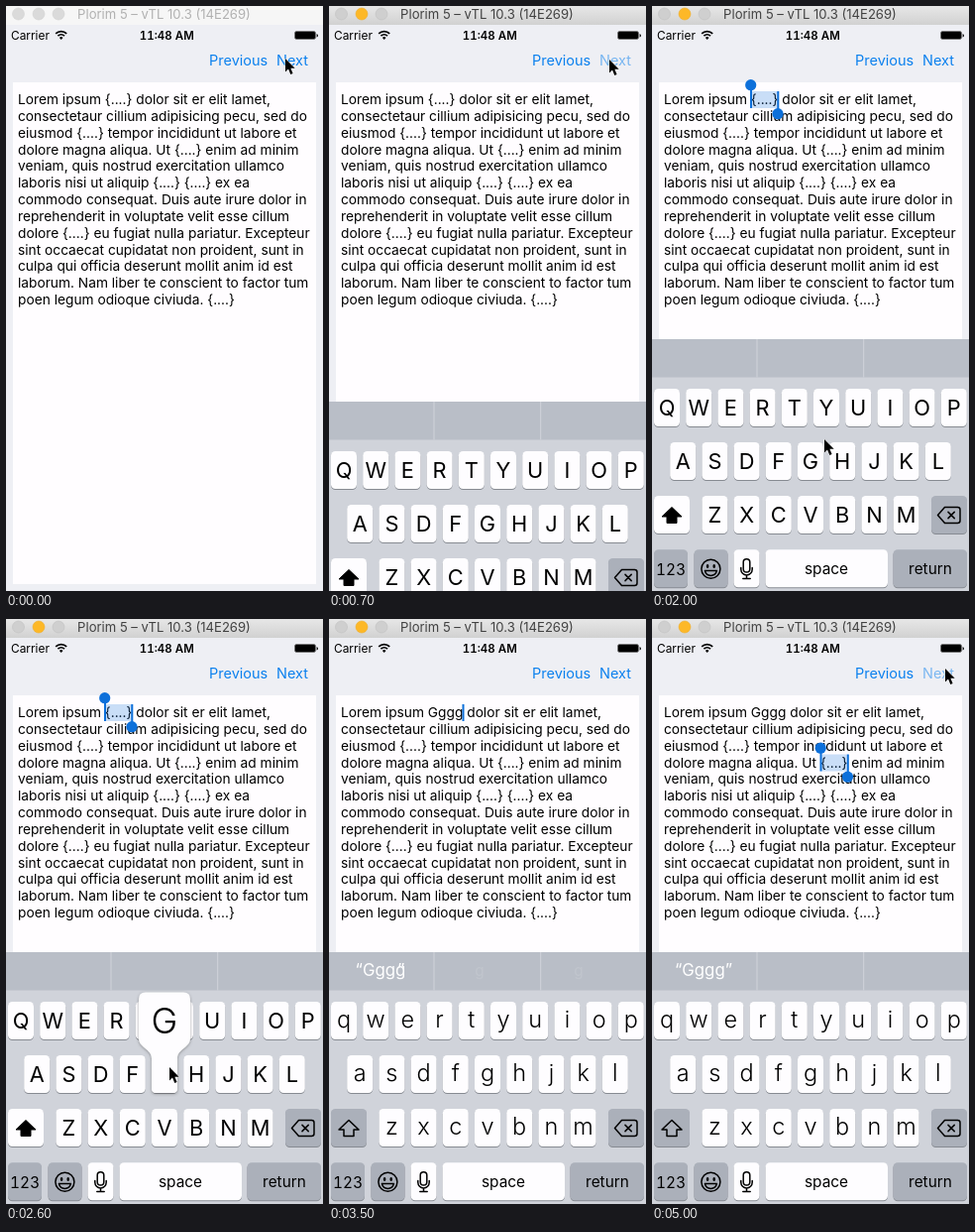
An HTML page for the animation above (5.1 s loop, 320 px wide and 590 px high).

```html
<!DOCTYPE html>
<html lang="en">
<head>
<meta charset="utf-8">
<title>Placeholder navigation</title>
<style>
  html, body { margin: 0; width: 100%; height: 100%; overflow: hidden; background: #eeeff4; }
  svg { display: block; font-family: Inter, Roboto, sans-serif; user-select: none; }
  .mid { text-anchor: middle; }
  .line { fill: none; stroke: #000; stroke-width: 1.5; stroke-linejoin: round; stroke-linecap: round; }
  .blue { fill: #0d70da; }
  .num { font-variant-numeric: tabular-nums; }
</style>
</head>
<body>
<svg width="320" height="590" viewBox="0 0 320 590">
  <defs>
    <linearGradient id="bar" x2="0" y2="1"><stop stop-color="#e7e7e7"/><stop offset="1" stop-color="#d1d1d1"/></linearGradient>
    <filter id="soft" x="-20%" y="-20%" width="140%" height="140%">
      <feDropShadow dx="0" dy="1" stdDeviation="1.5" flood-color="#555" flood-opacity=".55"/>
    </filter>
  </defs>
  <rect width="320" height="590" fill="#eeeff4"/>

  <rect id="titleBar" width="320" height="19"/>
  <g id="lights" stroke-width=".6">
    <circle cx="12.5" cy="8" r="6"/><circle id="amber" cx="33" cy="8" r="6"/><circle cx="53" cy="8" r="6"/>
  </g>
  <text id="title" class="mid" x="159.5" y="13" font-size="13.1">Plorim 5 – vTL 10.3 (14E269)</text>

  <text x="5" y="34" font-size="11.9">Carrier</text>
  <g fill="none" stroke="#000" stroke-width="1.7">
    <path d="M50.2 27.9a7.6 7.6 0 0 1 11 0M52.4 30.2a4.7 4.7 0 0 1 6.6 0"/>
    <path d="M55.7 34l-1.8-2.1a2.6 2.6 0 0 1 3.6 0z" fill="#000" stroke="none"/>
  </g>
  <text class="mid num" x="162.3" y="34" font-size="11.5" font-weight="600">11:48 AM</text>
  <rect x="291.5" y="25.5" width="21" height="8" rx="1.8" stroke="#777" stroke-width=".8"/>
  <path d="M313.6 28v3.6q1.4-.4 1.4-1.8t-1.4-1.8z"/>

  <g font-size="14.5" fill="#0b80ee">
    <text x="205" y="60">Previous</text>
    <text id="next" x="273" y="60">Next</text>
  </g>

  <rect x="7" y="77" width="306" height="506" fill="#fffdff"/>
  <g id="copy" font-size="13.74"></g>
  <rect id="caret" class="blue" y="86" width="2" height="17"/>
  <g id="selection" class="blue">
    <rect x="100" y="86" width="27" height="17" opacity=".22"/>
    <rect x="99" y="82" width="2" height="21"/><circle cx="99.7" cy="79.7" r="5.6"/>
    <rect x="126.3" y="86" width="2" height="21"/><circle cx="127" cy="108.7" r="5.6"/>
  </g>

  <g id="keyboard"></g>
  <path id="cursor" d="M0 0V13.4L3 10.600 5.300 15.900 7.600 14.900 5.400 9.700H9.700Z" stroke="#fff" stroke-width="1" stroke-linejoin="round" paint-order="stroke"/>
</svg>
<script>
const LOOP = 5100, STEP = 100, LINE = 16.84;
const $ = id => document.getElementById(id);
const show = (id, on) => $(id).setAttribute('visibility', on ? 'visible' : 'hidden');
const set = (id, attrs) => { for (const k in attrs) $(id).setAttribute(k, attrs[k]); };

const copy = [
  'Lorem ipsum {....} dolor sit er elit lamet,',
  'consectetaur cillium adipisicing pecu, sed do',
  'eiusmod {....} tempor incididunt ut labore et',
  'dolore magna aliqua. Ut {....} enim ad minim',
  'veniam, quis nostrud exercitation ullamco',
  'laboris nisi ut aliquip {....} {....} ex ea',
  'commodo consequat. Duis aute irure dolor in',
  'reprehenderit in voluptate velit esse cillum',
  'dolore {....} eu fugiat nulla pariatur. Excepteur',
  'sint occaecat cupidatat non proident, sunt in',
  'culpa qui officia deserunt mollit anim id est',
  'laborum. Nam liber te conscient to factor tum',
  'poen legum odioque civiuda. {....}'
];
$('copy').innerHTML = copy.map((s, i) => `<text x="12" y="${99 + i * LINE}">${s}</text>`).join('');
const firstLine = $('copy').firstChild;

// Keyboard, drawn in its raised position
const GRAY = '#abb0ba';
const key = (x, y, w, fill = '#fefdff') =>
  `<rect x="${x}" y="${y + 1}" width="${w}" height="38" rx="4.5" fill="#878b92"/>` +
  `<rect x="${x}" y="${y}" width="${w}" height="38" rx="4.5" fill="${fill}"/>`;
const label = (x, y, s, size = 15.4) => `<text class="mid num" x="${x}" y="${y}" font-size="${size}">${s}</text>`;

let caps = '', upper = '', lower = '';
[['QWERTYUIOP', 15, 386], ['ASDFGHJKL', 31.2, 440], ['ZXCVBNM', 63.4, 494]].forEach(([row, x0, y]) => {
  [...row].forEach((c, i) => {
    const x = x0 + i * 32.2;
    caps += key(x - 13, y, 26);
    upper += label(x, y + 26.7, c, 21.8);
    lower += label(x, y + 25.5, c.toLowerCase(), 23.5);
  });
});
const arrow = 'M20 505.5L30 515H25V521.5H15V515H10Z';

$('keyboard').innerHTML = `
  <rect y="336" width="320" height="260" fill="#d0d3da"/>
  <rect y="336" width="320" height="38.5" fill="#b9bec7"/>
  <path d="M106 336v38.5M213.7 336v38.5" stroke="#d0d3da"/>
  <g fill="#fff">
    <text id="guess" class="mid" x="52" y="360" font-size="16.8"></text>
    <g id="ghost"><text x="69" y="360" font-size="16.8">”</text>
      <g opacity=".1">${label(152, 360, 'g') + label(252, 360, 'g')}</g></g>
  </g>
  ${caps}
  <g id="upper">${upper}${key(2, 494, 36)}<path d="${arrow}" stroke="#000" stroke-linejoin="round"/></g>
  <g id="lower"><g font-weight="350">${lower}</g>${key(2, 494, 36, GRAY)}<path class="line" d="${arrow}"/></g>
  ${key(282, 494, 36, GRAY)}
  <path class="line" d="M288.500 513.500L295.500 505.500H308.500q2.500 0 2.500 2.500V519q0 2.500-2.500 2.500H295.500ZM299 510.400l6.200 6.200m0-6.200l-6.200 6.200"/>
  ${key(2, 548.3, 34, GRAY)}${label(19, 574, '123')}
  ${key(42.5, 548.3, 34, GRAY)}
  <circle class="line" cx="59.4" cy="567.8" r="9.5"/>
  <ellipse cx="56.1" cy="565" rx="1.3" ry="1.9"/><ellipse cx="62.7" cy="565" rx="1.3" ry="1.9"/>
  <path class="line" d="M53.4 569.4h12q-1 5-6 5t-6-5z"/>
  <g id="wide">${key(82.5, 548.3, 155.5)}${label(160, 573.3, 'space')}</g>
  <g id="withMic">${key(82.5, 548.3, 26)}${key(114.5, 548.3, 123.5)}${label(176, 573.3, 'space')}
    <rect class="line" x="92.2" y="557.7" width="6.6" height="13.4" rx="3.3"/>
    <path class="line" d="M89.8 566.5v1.8a5.7 5.7 0 0 0 11.4 0v-1.8M95.5 574v3.6M91.8 577.6h7.4"/></g>
  ${key(243.5, 548.3, 74.5, GRAY)}${label(281, 573.3, 'return')}
  <g id="popup"><path filter="url(#soft)" fill="#fefdff" d="M141 376.5h38q7 0 7 7V423c0 9-13 11-13 20V474q0 4-4 4H151q-4 0-4-4V443c0-9-13-11-13-20V383.5q0-7 7-7z"/>
    <text id="popupLetter" class="mid" x="160" y="418" font-size="36" font-weight="300"></text></g>`;

// Eased interpolation through [time, ...values] stops
function track(t, stops) {
  const i = stops.findIndex(s => s[0] > t);
  if (i < 0) return stops.at(-1).slice(1);
  if (!i) return stops[0].slice(1);
  const a = stops[i - 1], b = stops[i], u = (t - a[0]) / (b[0] - a[0]), e = u * u * (3 - 2 * u);
  return a.slice(1).map((v, k) => v + (b[k + 1] - v) * e);
}

const pointer = [[0, 282, 53], [100, 283, 54], [1300, 283, 54], [1700, 182, 502], [1800, 180, 500],
  [2000, 174, 437], [2400, 165, 452], [3400, 165, 452], [3600, 320, 340], [3800, 312, 230], [4200, 296, 50]];
const nextAlpha = [[300, 1], [400, .25], [600, .25], [700, .52], [900, 1], [4300, 1], [4400, .25],
  [4500, .5], [4700, 1], [4900, 1], [5000, .5]];
const typedAt = [2700, 3000, 3200, 3400];

function draw(t) {
  const active = t >= 200;
  set('titleBar', { fill: active ? 'url(#bar)' : '#f6f6f6' });
  set('title', { fill: active ? '#424242' : '#b1b1b1' });
  set('lights', { fill: active ? '#cfcfcf' : '#dadada', stroke: active ? '#c2c2c2' : '#d2d2d2' });
  set('amber', active ? { fill: '#fdb827', stroke: '#eeae2c' } : { fill: '#dadada', stroke: '#d2d2d2' });
  set('next', { opacity: track(t, nextAlpha)[0] });

  // Critically damped spring raises the keyboard
  const w = 18.26 * Math.max(0, t - 552) / 1000;
  set('keyboard', { transform: `translate(0 ${Math.round(254 * (1 + w) * Math.exp(-w))})` });
  show('wide', t < 1100);
  show('withMic', t >= 1100);

  const count = typedAt.filter(k => t >= k).length, word = 'Gggg'.slice(0, count);
  firstLine.textContent = count ? copy[0].replace('{....}', word) : copy[0];
  show('upper', !count);
  show('lower', count);

  const swapping = t >= 3400 && t < 3600;
  $('guess').textContent = count ? '“' + word + (swapping ? '' : '”') : '';
  show('ghost', swapping);

  show('popup', t >= 2500 && t < 2700 || typedAt.slice(1).some(k => t >= k - STEP && t < k));
  $('popupLetter').textContent = count ? 'g' : 'G';

  const second = t >= 4500;
  show('selection', t >= 1100 && !count || second);
  set('selection', { transform: second ? `translate(70.5 ${3 * LINE})` : '' });
  set('caret', { x: 100.5 + 8.5 * count });
  show('caret', count && !second && (t < 3400 || (t - 3400) % 1000 < 600));

  const [x, y] = track(t, pointer);
  set('cursor', { transform: `translate(${x} ${y})` });
  show('cursor', t < 3500 || t >= 3700);
}

const start = performance.now();
function frame() {
  const t = (performance.now() - start) % LOOP;
  draw(Math.floor(t / STEP) * STEP);
  requestAnimationFrame(frame);
}
frame();
</script>
</body>
</html>
```
